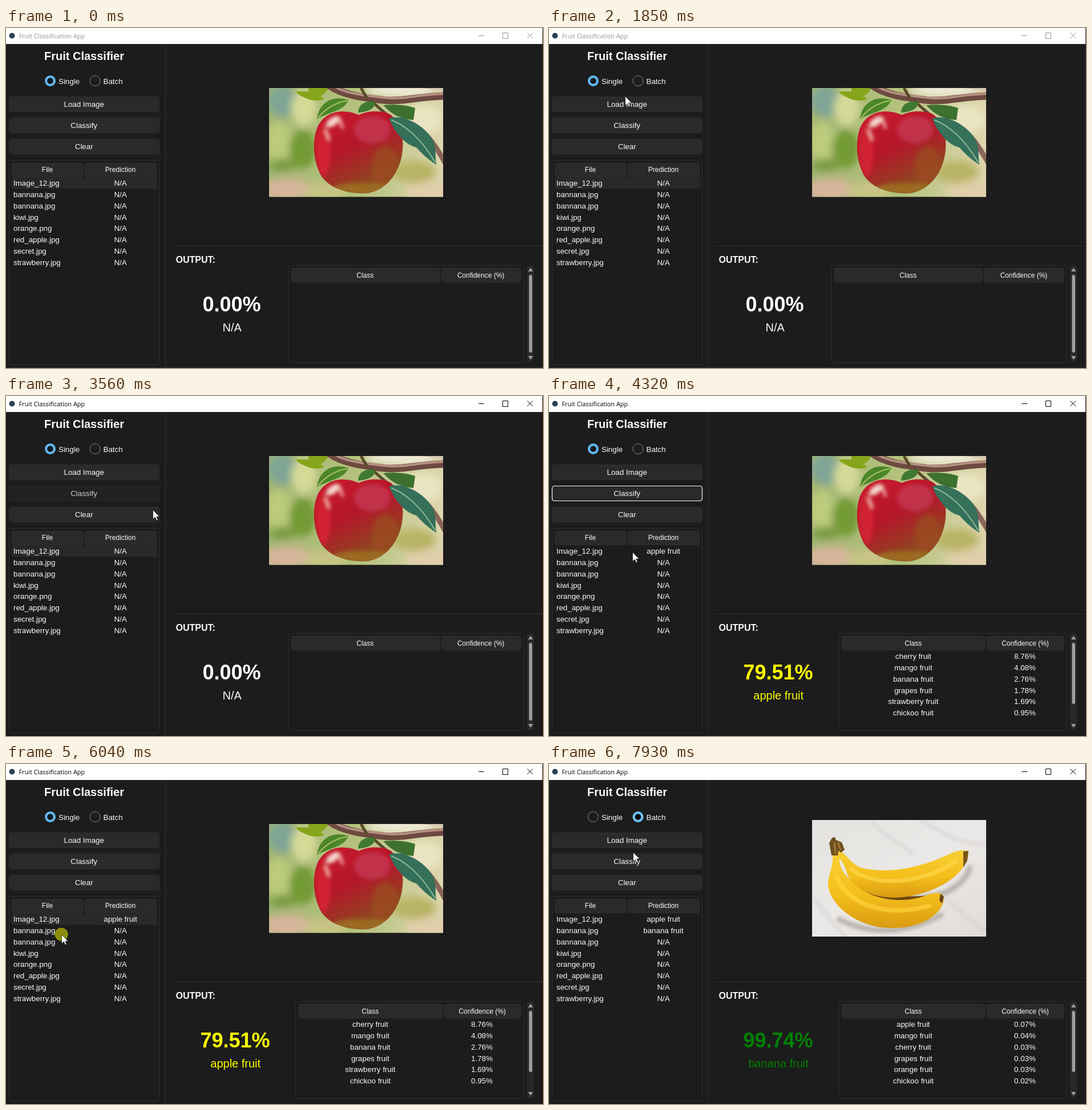
An HTML page for the animation above (8000 ms loop, 941 px wide and 595 px high).

```html
<!DOCTYPE html>
<html lang="en">
<head>
<meta charset="utf-8">
<title>Fruit Classification App</title>
<style>
  html, body { margin: 0; width: 100%; height: 100%; overflow: hidden; background: #1c1c1c; }
  svg { display: block; width: 941px; height: 595px; }
  text { font: 13.33px "Liberation Sans", Arial, sans-serif; fill: #fafafa; }
  .mid { text-anchor: middle; }
  .small { font-size: 12px; }
  .caption { font: 10.9px "Open Sans", "Noto Sans", sans-serif; }
  .h1 { font-size: 20px; font-weight: bold; }
  .h2 { font-size: 16px; font-weight: bold; }
  .score { font-size: 36px; font-weight: bold; }
  .label { font-size: 20px; }
  .box { fill: #2a2a2a; stroke: #303030; }
  .frame { fill: none; stroke: #2f2f2f; }
  .blank { fill: #1c1c1c; }
  .thumb { fill: #9f9f9f; }
  .yellow text { fill: #ff0; }
  .green text { fill: #008000; }
  .ring { fill: none; stroke: #fafafa; stroke-width: 1.2; }
  .off { fill: #1c1c1c; stroke: #8c8c8c; }
</style>
</head>
<body>
<svg viewBox="0 0 941 595">
  <defs>
    <filter id="soft" x="-30%" y="-30%" width="160%" height="160%"><feGaussianBlur stdDeviation="7"/></filter>
    <filter id="haze" x="-30%" y="-30%" width="160%" height="160%"><feGaussianBlur stdDeviation="3"/></filter>
    <clipPath id="appleClip"><rect x="461" y="105" width="305" height="190.5"/></clipPath>
    <clipPath id="fruitClip"><path id="fruit" d="M618 152C592 140 559 145 546 173C536 197 538 232 552 258C567 282 602 291 634 289C664 284 688 257 694 221C699 185 690 160 669 149C650 143 632 146 618 152Z"/></clipPath>
    <clipPath id="bananaClip"><rect x="461" y="98" width="305" height="204"/></clipPath>
    <linearGradient id="skin" x1="0" y1="0" x2=".55" y2="1">
      <stop offset="0" stop-color="#cb1a2c"/><stop offset=".5" stop-color="#b5162a"/>
      <stop offset=".78" stop-color="#9c3423"/><stop offset="1" stop-color="#85501f"/>
    </linearGradient>
    <linearGradient id="meadow">
      <stop offset="0" stop-color="#a4b573"/><stop offset=".5" stop-color="#b4c27c"/><stop offset="1" stop-color="#ddd5ae"/>
    </linearGradient>
    <linearGradient id="marble" x1="0" y1="0" x2="1" y2="1">
      <stop offset="0" stop-color="#e4e3e0"/><stop offset=".5" stop-color="#ebe9e7"/><stop offset="1" stop-color="#dfdcd9"/>
    </linearGradient>
    <linearGradient id="peel" x1="0" y1="0" x2="0" y2="1">
      <stop offset="0" stop-color="#f8cf35"/><stop offset=".55" stop-color="#f5bf1c"/><stop offset="1" stop-color="#d99b12"/>
    </linearGradient>
  </defs>

  <rect class="blank" width="941" height="595"/>

  <!-- title bar -->
  <rect width="941" height="28" fill="#fff"/>
  <circle cx="10.5" cy="13.5" r="5" fill="#2d4350"/>
  <g id="caption">
    <text class="caption" x="22.5" y="18" style="fill:currentColor">Fruit Classification App</text>
    <path d="M828 13.5H838M870.5 8.5H879.5V18.5H870.5ZM913.5 8.5L923 18M923 8.5L913.5 18" fill="none" stroke="currentColor"/>
  </g>
  <path id="edge" d="M940.5 0V595M0 594.5H941" fill="none"/>

  <path d="M279.5 28V595M290 381.5H940" stroke="#303030"/>

  <!-- side panel -->
  <text class="h1 mid" x="137" y="56">Fruit Classifier</text>
  <g data-on="0-7470">
    <circle cx="77.5" cy="92.5" r="7.4" fill="#141a1c" stroke="#62b5ee" stroke-width="4.2"/>
    <circle class="off" cx="156" cy="92.5" r="9"/>
  </g>
  <g data-on="7470-8000">
    <circle class="off" cx="77.5" cy="92.5" r="9"/>
    <circle cx="156" cy="92.5" r="7.4" fill="#050505" stroke="#6cc3f2" stroke-width="4.2"/>
    <circle data-on="7470-7930" cx="156" cy="92.5" r="7.4" fill="#1c1c1c" stroke="#4f9cc4" stroke-width="4.2"/>
  </g>
  <text x="92" y="97.5">Single</text>
  <text x="170.5" y="97.5">Batch</text>
  <g id="buttons"></g>
  <g data-on="2340-3770 6600-6850">
    <rect x="5.5" y="157.5" width="263" height="26" rx="4" fill="#212121" stroke="#2c2c2c"/>
    <text class="mid" x="136.5" y="174.7" style="fill:#cdcdcd">Classify</text>
  </g>
  <rect class="ring" data-on="3770-5080 6850-7470" x="5.5" y="157.5" width="263" height="26" rx="4"/>

  <rect class="frame" x="5.5" y="231.5" width="263" height="358" rx="5"/>
  <g id="files"></g>

  <!-- photos -->
  <g data-on="0-6110" clip-path="url(#appleClip)">
    <rect x="461" y="105" width="305" height="191" fill="url(#meadow)"/>
    <g filter="url(#soft)">
      <ellipse cx="484" cy="128" rx="26" ry="28" fill="#7fa596"/>
      <ellipse cx="522" cy="140" rx="22" ry="32" fill="#d5d996"/>
      <ellipse cx="478" cy="200" rx="22" ry="36" fill="#bccb7d"/>
      <ellipse cx="520" cy="212" rx="24" ry="34" fill="#729a35"/>
      <ellipse cx="485" cy="240" rx="24" ry="12" fill="#7b9c44"/>
      <ellipse cx="492" cy="283" rx="44" ry="20" fill="#d7b59c"/>
      <ellipse cx="560" cy="285" rx="38" ry="16" fill="#c9c486"/>
      <ellipse cx="730" cy="160" rx="34" ry="26" fill="#ebe4c2"/>
      <ellipse cx="715" cy="252" rx="38" ry="20" fill="#b9b465"/>
      <ellipse cx="745" cy="285" rx="50" ry="16" fill="#e0cfaa"/>
      <ellipse cx="690" cy="108" rx="60" ry="13" fill="#eee9d6"/>
    </g>
    <path d="M507 112C528 108 545 114 558 124C545 130 526 127 507 112ZM530 105H565C558 118 545 126 530 118Z" fill="#86a51b"/>
    <path d="M566 100C590 118 628 122 660 126S720 120 770 119" fill="none" stroke="#6d4a40" stroke-width="13"/>
    <path d="M572 100C592 115 630 118 664 122S720 116 770 115" fill="none" stroke="#b59184" stroke-width="4"/>
    <path d="M731 183C746 196 756 212 770 237" fill="none" stroke="#8b6358" stroke-width="9"/>
    <path d="M622 105L632 122M640 126C650 138 660 145 668 152" stroke="#5a4a2c" stroke-width="5" fill="none"/>
    <use href="#fruit" fill="url(#skin)"/>
    <g clip-path="url(#fruitClip)" filter="url(#haze)">
      <ellipse cx="642" cy="178" rx="32" ry="24" fill="#c43855" opacity=".75"/>
      <ellipse cx="556" cy="215" rx="13" ry="45" fill="#d02433"/>
      <ellipse cx="664" cy="245" rx="24" ry="38" fill="#9b4b20" opacity=".8"/>
      <ellipse cx="625" cy="281" rx="52" ry="10" fill="#9b6b24"/>
      <ellipse cx="573" cy="164" rx="14" ry="7" fill="#f5d5cd" transform="rotate(-35 573 164)"/>
      <path d="M560 178L567 196M584 158L590 176" stroke="#f0b2a9" stroke-width="5"/>
    </g>
    <path d="M545 159C548 131 573 116 600 126C592 145 572 145 545 159Z" fill="#4c8629"/>
    <path d="M547 157C560 140 577 131 598 127" fill="none" stroke="#a8c067" stroke-width="2"/>
    <path d="M617 148C618 135 626 127 646 129C649 140 635 147 617 148Z" fill="#3e7930"/>
    <path d="M661 135C682 133 702 135 717 140L714 161C694 160 677 153 661 135Z" fill="#3c7130"/>
    <path d="M671 158C697 150 734 170 749 198C754 211 752 225 754 239C742 232 730 221 719 209C702 205 683 187 671 158Z" fill="#34705a"/>
    <path d="M675 161C701 170 730 197 752 235" fill="none" stroke="#8eb898" stroke-width="2"/>
    <path d="M728 105C741 106 752 108 766 112V105Z" fill="#d7c9b2"/>
  </g>
  <g data-on="6110-8000" clip-path="url(#bananaClip)">
    <rect x="461" y="98" width="305" height="204" fill="url(#marble)"/>
    <g filter="url(#haze)" fill="none" stroke="#cfcccb" stroke-width="3">
      <path d="M565 98C580 125 620 138 640 160M650 98C690 118 700 135 766 142M690 235C720 250 735 278 766 292M461 235C480 250 490 275 520 302"/>
      <path d="M505 195C560 225 610 250 695 225C720 212 735 196 738 178M505 270C560 300 630 298 690 262" stroke="#b8b0a9" stroke-width="9"/>
    </g>
    <path d="M515 194C550 224 610 240 687 227L640 248L560 246Z" fill="#6d4812"/>
    <path d="M508 150C520 157 530 176 548 182C602 194 660 178 705 156C718 150 730 150 734 153C737 163 730 176 720 188C700 211 657 232 606 234C563 233 532 218 522 191C518 176 510 165 503 158Z" fill="url(#peel)"/>
    <path d="M527 182C561 213 645 215 716 169" fill="none" stroke="#ffda4d" stroke-width="7" opacity=".65"/>
    <path d="M726 153L735 152L733 169L726 181Z" fill="#75551b"/>
    <path d="M499 156L509 162C508 182 518 193 533 208C565 240 625 246 666 228C676 225 685 225 690 229C694 240 689 251 678 262C655 284 615 291 575 285C531 276 495 247 489 214C488 195 498 184 497 160Z" fill="url(#peel)"/>
    <path d="M503 196C523 246 590 270 670 247" fill="none" stroke="#ffd63c" stroke-width="8" opacity=".65"/>
    <path d="M686 227L692 232L689 244L684 239Z" fill="#68491a"/>
    <path d="M496 129L501 128L503 133L513 137L518 150L512 155L507 152L506 160L495 160L491 138Z" fill="#70501f"/>
    <path d="M500 137L502 157M506 137L511 150" stroke="#b28a3c" stroke-width="2"/>
  </g>

  <!-- output panel -->
  <text class="h2" x="297.5" y="411">OUTPUT:</text>
  <g id="output"></g>
  <rect x="913" y="415" width="12" height="170" rx="6" fill="#282828"/>
  <path class="thumb" d="M915 426L919.2 419.5L923.4 426ZM915 574L919.2 580.5L923.4 574Z"/>
  <rect class="thumb" data-on="0-3770 6110-6850" x="916.5" y="432" width="5.5" height="136" rx="2.7"/>
  <rect class="thumb" data-on="3770-6110 6850-8000" x="916.5" y="432" width="5.5" height="107" rx="2.7"/>

  <g id="pointer">
    <circle data-on="2270-2410 5010-5150 6000-6110 6640-6780 7400-7540" r="11.6" fill="#ff0" opacity=".5"/>
    <path d="M.5 .5V16.5L4.2 13L6.8 18.6L9.2 17.6L6.7 12.1H11.8Z" fill="#fff" stroke="#111" stroke-width=".7"/>
  </g>
</svg>
<script>
const LOOP = 8000, PITCH = 19.85;
const $ = id => document.getElementById(id);

const text = (x, y, s, cls = "") => `<text x="${x}" y="${y}" class="${cls}">${s}</text>`;
const box = (x1, y1, x2, y2, cls = "box", r = 4) =>
  `<rect class="${cls}" x="${x1 + .5}" y="${y1 + .5}" width="${x2 - x1 - 1}" height="${y2 - y1 - 1}" rx="${r}"/>`;
const during = (on, body, cls = "") => `<g data-on="${on}" class="${cls}">${body}</g>`;

$("buttons").innerHTML = ["Load Image", "Classify", "Clear"].map((name, i) =>
  box(5, 120 + i * 37, 269, 147 + i * 37) + text(136.7, 137.8 + i * 36.9, name, "mid")).join("");

const files = ["Image_12.jpg", "bannana.jpg", "bannana.jpg", "kiwi.jpg", "orange.png",
  "red_apple.jpg", "secret.jpg", "strawberry.jpg"];
const found = { 0: [3770, "apple fruit"], 1: [6850, "banana fruit"] };
const rowMark = y => `<rect x="10" y="${y}" width="255" height="20" fill="#292929"/>`;

$("files").innerHTML =
  box(10, 236, 136, 261) + box(138, 236, 264, 261) +
  text(72.5, 252, "File", "small mid") + text(200.5, 252, "Prediction", "small mid") +
  during("0-3770 5080-6110", rowMark(261.5)) + during("6110-6850", rowMark(281.4)) +
  files.map((name, i) => {
    const y = 276 + i * PITCH, [at, fruit] = found[i] || [LOOP, ""];
    return text(13, y, name) + during(`0-${at}`, text(200.5, y, "N/A", "mid")) +
      during(`${at}-${LOOP}`, text(200.5, y, fruit, "mid"));
  }).join("");

function table(left, split, classX, confX, rows = []) {
  return box(left, 415, 908, 586, "frame", 5) +
    box(left + 5.5, 420, split, 445) + box(split + 2, 420, 903, 445) +
    text(classX, 436.5, "Class", "small mid") + text(confX, 436.5, "Confidence (%)", "small mid") +
    rows.map(([name, pct], i) => text(classX, 460 + i * PITCH, name + " fruit", "mid") +
      text(confX - .5, 460 + i * PITCH, pct + "%", "mid")).join("");
}
const summary = (x, score, label) => text(x, 495.5, score, "score mid") + text(x + .7, 531, label, "label mid");
const result = (on, score, label, cls, rows) =>
  during(on, summary(401.5, score, label), cls) + during(on, table(507, 765, 638.3, 834.5, rows));

$("output").innerHTML =
  during("0-3770 6110-6850", summary(395.5, "0.00%", "N/A") + table(494, 760, 629.3, 832)) +
  result("3770-6110", "79.51%", "apple fruit", "yellow",
    [["cherry", "8.76"], ["mango", "4.08"], ["banana", "2.76"], ["grapes", "1.78"], ["strawberry", "1.69"], ["chickoo", "0.95"]]) +
  result("6850-8000", "99.74%", "banana fruit", "green",
    [["apple", "0.07"], ["mango", "0.04"], ["cherry", "0.03"], ["grapes", "0.03"], ["orange", "0.03"], ["chickoo", "0.02"]]) +
  // the widened label repaints its left edge a moment late
  during("3770-3840 6850-6920", '<rect class="blank" x="337" y="468" width="22" height="64"/>');

// pointer track: time, x, y
const track = [
  [330, 877, 533], [470, 700, 455], [610, 450, 340], [750, 220, 268], [820, 150, 263], [950, 91, 279],
  [1080, 91, 279], [1160, 79, 274], [1400, 79, 274], [1560, 63, 240], [1700, 90, 170], [1850, 133, 119],
  [1980, 160, 128], [2200, 148, 166], [2960, 148, 166], [3150, 165, 145], [3350, 215, 165], [3560, 257, 199],
  [3770, 279, 238], [4060, 279, 238], [4320, 146, 273], [4500, 90, 283], [4600, 83, 280], [4880, 88, 274],
  [5150, 88, 274], [5450, 118, 266], [5760, 110, 268], [6030, 97, 298], [6120, 97, 298], [6590, 152, 166],
  [7070, 152, 166], [7380, 165, 88], [7620, 165, 88], [7860, 167, 96], [7930, 147, 154], [8000, 147, 154]
];

function pointerAt(t) {
  const i = Math.max(1, track.findIndex(k => k[0] > t));
  const [t0, x0, y0] = track[i - 1], [t1, x1, y1] = track[i];
  const p = (t - t0) / (t1 - t0);
  return [x0 + (x1 - x0) * p, y0 + (y1 - y0) * p];
}

const timed = [...document.querySelectorAll("[data-on]")].map(el =>
  [el, el.dataset.on.split(" ").map(r => r.split("-").map(Number))]);

function draw(t) {
  for (const [el, spans] of timed)
    el.style.display = spans.some(([a, b]) => t >= a && t < b) ? "" : "none";
  const active = t >= 2340;
  $("caption").style.color = active ? "#000" : "#929292";
  $("edge").style.stroke = active ? "#161616" : "#2b302e";
  $("pointer").style.display = t < 330 ? "none" : "";
  if (t >= 330) $("pointer").setAttribute("transform", `translate(${pointerAt(t).map(Math.round)})`);
}

const start = performance.now();
function tick() {
  draw((performance.now() - start) % LOOP);
  requestAnimationFrame(tick);
}
tick();
</script>
</body>
</html>
```
